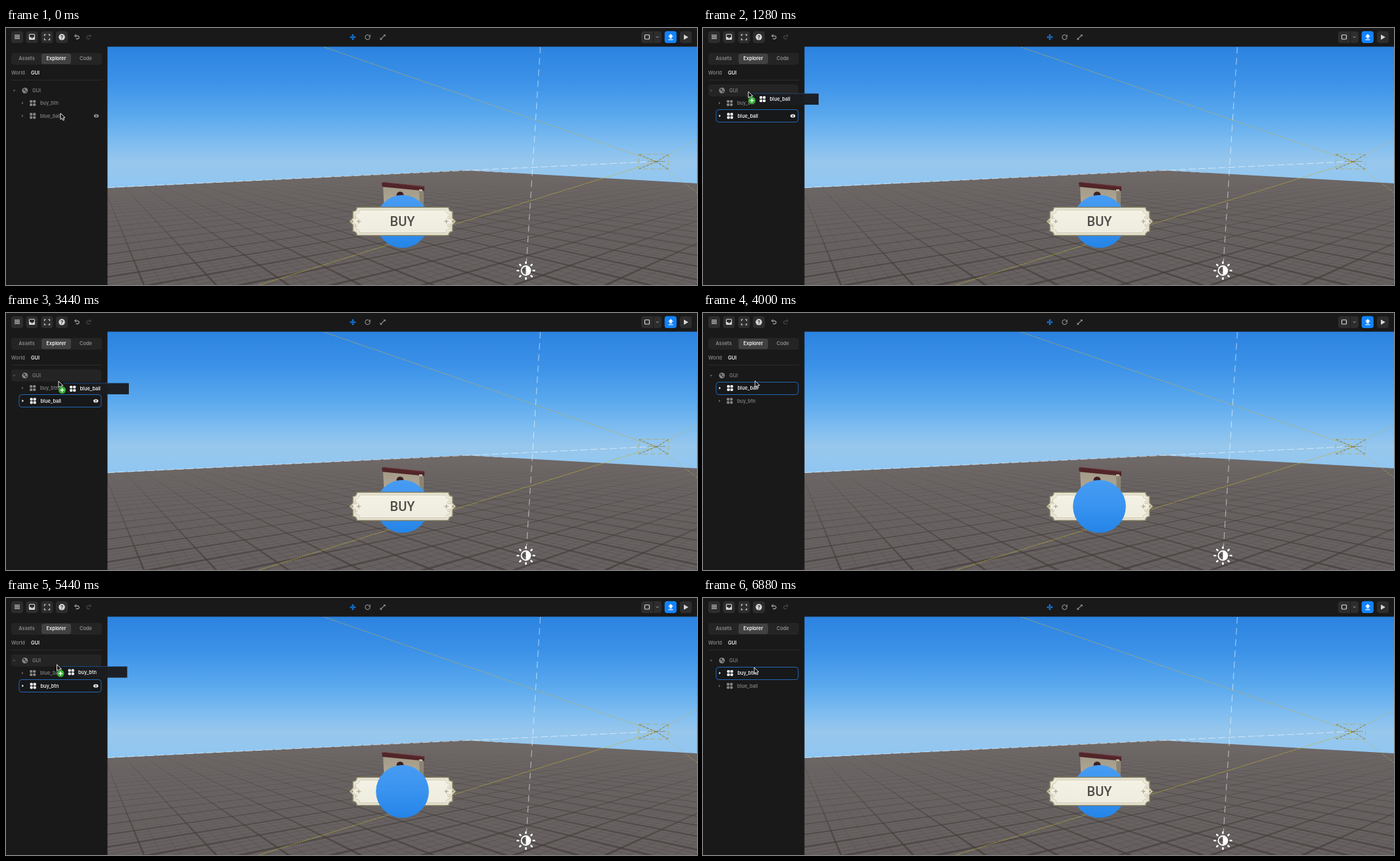
Write an HTML page with a canvas that moves like this. It is 1052 by 392 pixels and loops after 6.96 s.

```html
<!DOCTYPE html>
<html lang="en">
<head>
<meta charset="utf-8">
<title>Scene editor</title>
<style>
html, body { margin: 0; width: 100%; height: 100%; overflow: hidden; background: #191919; }
canvas { display: block; width: 1052px; height: 392px; }
</style>
</head>
<body>
<canvas id="stage" width="1052" height="392"></canvas>
<script>
const W = 1052, H = 392, LOOP = 6960, STEP = 80;
const view = document.getElementById('stage').getContext('2d');
let g = view;

function poly(points, fill, stroke, width = 1, close = true) {
  g.beginPath();
  points.forEach(([x, y], i) => i ? g.lineTo(x, y) : g.moveTo(x, y));
  if (close) g.closePath();
  if (fill) { g.fillStyle = fill; g.fill(); }
  if (stroke) { g.strokeStyle = stroke; g.lineWidth = width; g.stroke(); }
}
function line(x1, y1, x2, y2, color, width = 1, dash = []) {
  g.setLineDash(dash);
  poly([[x1, y1], [x2, y2]], null, color, width, false);
  g.setLineDash([]);
}
function box(x, y, w, h, r, fill, stroke, width = 1) {
  g.beginPath();
  g.roundRect(x, y, w, h, r);
  if (fill) { g.fillStyle = fill; g.fill(); }
  if (stroke) { g.strokeStyle = stroke; g.lineWidth = width; g.stroke(); }
}
function disc(x, y, r, fill) {
  g.beginPath();
  g.arc(x, y, r, 0, 7);
  g.fillStyle = fill;
  g.fill();
}
function arc(x, y, r, from, to, color, width) {
  g.beginPath();
  g.arc(x, y, r, from, to);
  g.strokeStyle = color;
  g.lineWidth = width;
  g.stroke();
}
function text(s, x, y, color, weight = 500, size = 7.4, align = 'left') {
  g.font = `${weight} ${size}px Inter, sans-serif`;
  g.textAlign = align;
  g.textBaseline = 'alphabetic';
  g.fillStyle = color;
  g.fillText(s, x, y + size * 0.36);
}
function fade(y1, y2, ...stops) {
  const f = g.createLinearGradient(0, y1, 0, y2);
  stops.forEach(([p, c]) => f.addColorStop(p, c));
  return f;
}
function spokes(x, y, r, color, width, count, inner = 0) {
  for (let i = 0; i < count; i++) {
    const a = i * 2 * Math.PI / count, c = Math.cos(a), s = Math.sin(a);
    line(x + c * inner, y + s * inner, x + c * r, y + s * r, color, width);
  }
}

// Lines through one vanishing point, evenly spaced along the bottom edge.
function gridLines(vx, vy, start, gap, count) {
  for (let i = 0; i < count * 4; i++) {
    const bold = i % 4 === 0;
    const x = start + i * gap / 4;
    const shade = bold
      ? fade(215, H, [0, 'rgba(72,64,63,.05)'], [0.3, 'rgba(72,64,63,.35)'], [1, 'rgba(68,61,60,.75)'])
      : fade(215, H, [0, 'rgba(80,72,71,.02)'], [0.3, 'rgba(80,72,71,.13)'], [1, 'rgba(78,70,69,.38)']);
    const near = bold ? 2.6 : 1, base = 0.4;
    const at = y => vx + (x - vx) * (y - vy) / (H - vy);
    const w = y => (base + near * (y - 215) / (H - 215)) / 2;
    const slope = Math.min(6, Math.hypot(1, (x - vx) / (H - vy)));
    poly([[at(215) - w(215) * slope, 215], [at(215) + w(215) * slope, 215],
      [x + w(H) * slope, H], [x - w(H) * slope, H]], shade);
  }
}

function drawWorld() {
  g.fillStyle = fade(28, 240, [0, '#2c83e0'], [0.25, '#3c92e8'], [0.5, '#5aa9ee'],
    [0.72, '#83bff0'], [0.83, '#98c7ec'], [0.92, '#94c7ef'], [1, '#8fc6f1']);
  g.fillRect(154, 28, 898, 221);

  g.save();
  const ground = [[154, 244], [700, 217], [W, 237], [W, H], [154, H]];
  poly(ground, fade(217, H, [0, '#706a69'], [0.35, '#6a6564'], [1, '#666160']));
  g.clip();
  gridLines(125, 184, 210, 110, 33);
  gridLines(1367, 184, -2840, 139, 32);
  g.restore();

  line(155, 243.5, 990, 203.5, 'rgba(255,255,255,.7)', 0.8, [11, 4]);
  line(700, 217, 770, 221, 'rgba(255,255,255,.4)', 0.7, [8, 6]);
  line(813.5, 29, 792.5, 356, 'rgba(255,255,255,.75)', 0.8, [10, 7]);

  // Camera frustum
  const gold = '#c0ae56';
  line(484, 29, 990, 204, gold, 0.75, [3, 1]);
  line(385, 392, 990, 204, '#c2b035', 0.75, [3, 1]);
  line(990, 204, W, 170, gold, 0.7, [3, 2]);
  line(990, 204, W, 251, gold, 0.7, [3, 2]);
  g.setLineDash([7, 4]);
  box(963.5, 192.5, 45, 22.5, 0, null, '#b5a552', 0.7);
  g.setLineDash([]);
  for (const [x, y] of [[964, 193], [1008, 193], [964, 215], [1008, 215]])
    line(x, y, 990, 204, '#6f693f', 0.8, [4, 2]);
  line(977, 203.5, 1004, 203.5, '#8a814c', 0.7);
  line(986, 198, 985, 211, '#d9c24a', 0.7, [3, 2]);

  // Sun gizmo
  const sx = 791.5, sy = 370;
  arc(sx, sy, 7, 0, 7, '#fff', 1.8);
  g.beginPath();
  g.arc(sx, sy, 6.5, -Math.PI / 2, Math.PI / 2);
  g.fillStyle = '#fff';
  g.fill();
  g.lineCap = 'round';
  spokes(sx, sy, 13, '#fff', 2.6, 8, 11.3);
  g.lineCap = 'butt';

  // Shop
  poly([[574, 241], [636, 247], [635, 280], [576, 280]], fade(242, 280, [0, '#a39b88'], [1, '#b5ad98']));
  poly([[629, 247], [636, 248], [635, 280], [630, 280]], '#8b8473');
  disc(600, 255, 5.5, '#3b2021');
  poly([[572, 236], [575, 235.5], [637, 241.5], [637, 248.5], [573, 242.3]], '#512529');
  poly([[573, 235.5], [576, 235.2], [637, 241.3], [636, 243]], '#6c3437');
  poly([[629, 246], [634, 246.5], [634, 249], [629, 248.5]], '#c9c1ae');
}

function drawBall() {
  disc(603.5, 295, 40.3, fade(255, 335, [0, '#479cf3'], [0.45, '#3a94f0'], [1, '#2485e8']));
}

function plate(inset) {
  const cx = 604, cy = 295, w = 76 - inset, h = 21.5 - inset, n = 6, tip = 81 - inset;
  g.beginPath();
  g.moveTo(cx - w + n, cy - h);
  g.lineTo(cx + w - n, cy - h);
  g.quadraticCurveTo(cx + w - n, cy - h + n, cx + w, cy - h + n);
  g.lineTo(cx + w, cy - 5);
  g.quadraticCurveTo(cx + w + 2, cy - 3, cx + tip, cy);
  g.quadraticCurveTo(cx + w + 2, cy + 3, cx + w, cy + 5);
  g.lineTo(cx + w, cy + h - n);
  g.quadraticCurveTo(cx + w - n, cy + h - n, cx + w - n, cy + h);
  g.lineTo(cx - w + n, cy + h);
  g.quadraticCurveTo(cx - w + n, cy + h - n, cx - w, cy + h - n);
  g.lineTo(cx - w, cy + 5);
  g.quadraticCurveTo(cx - w - 2, cy + 3, cx - tip, cy);
  g.quadraticCurveTo(cx - w - 2, cy - 3, cx - w, cy - 5);
  g.lineTo(cx - w, cy - h + n);
  g.quadraticCurveTo(cx - w + n, cy - h + n, cx - w + n, cy - h);
  g.closePath();
}
function drawPlate() {
  plate(0);
  g.fillStyle = fade(273, 317, [0, '#f4f2e5'], [1, '#eeecde']);
  g.fill();
  g.strokeStyle = '#827c61';
  g.lineWidth = 1.5;
  g.stroke();
  plate(1.6);
  g.strokeStyle = '#d8d4bc';
  g.lineWidth = 1.2;
  g.stroke();
  plate(4);
  g.strokeStyle = '#bfbaa0';
  g.lineWidth = 0.8;
  g.stroke();
  for (const x of [537, 670.5]) {
    const star = [];
    for (let i = 0; i < 8; i++) {
      const r = i % 2 ? 1.3 : 4.5, a = i * Math.PI / 4;
      star.push([x + r * Math.cos(a), 295 + r * Math.sin(a)]);
    }
    poly(star, '#b7b29c');
    const out = x < 600 ? -1 : 1;
    for (const s of [-1, 1]) arc(x + out * 4, 295 + s * 6, 2, 0, 5, '#c2bda5', 0.9);
    disc(x + out * 10, 295, 1.8, '#a8a27f');
  }
  g.font = '500 20px Roboto, sans-serif';
  g.textAlign = 'center';
  g.textBaseline = 'alphabetic';
  g.fillStyle = '#524d4b';
  g.fillText('BUY', 603.5, 302);
}

function arrows4(x, y, r, color, width, out) {
  spokes(x, y, r, color, width, 4);
  for (let i = 0; i < 4; i++) {
    g.save();
    g.translate(x, y);
    g.rotate(i * Math.PI / 2);
    poly([[r + out, 0], [r - 1, -2], [r - 1, 2]], color);
    g.restore();
  }
}
function bend(x, y, dir, color) {
  g.save();
  g.translate(x, y);
  g.scale(dir, 1);
  line(-2.5, -1.5, 1, -1.5, color);
  arc(1, 0.8, 2.3, -Math.PI / 2, Math.PI / 2, color, 1);
  line(1, 3.1, -1.5, 3.1, color);
  poly([[-1.2, -3.8], [-3.5, -1.5], [-1.2, 0.8]], null, color, 1, false);
  g.restore();
}

function drawChrome() {
  g.fillStyle = '#191919';
  g.fillRect(0, 0, W, 28.5);
  g.fillRect(0, 0, 154.5, H);
  const lite = '#d6d6d6', dim = '#8b8b8b', key = '#2d2d2d';
  for (const x of [8, 30.5, 53.5, 76, 1026]) box(x, 5, 18, 18, 4, key);
  for (const y of [11, 13.5, 16]) line(13, y, 21, y, lite, 1.2);
  box(35.5, 9.5, 8, 8, 1.2, null, lite, 1.2);
  poly([[35.5, 14], [38, 14], [39, 15.5], [40.5, 15.5], [41.5, 14], [43.5, 14], [43.5, 18], [35.5, 18]], lite);
  for (const a of [-1, 1]) for (const b of [-1, 1])
    poly([[62.5 + a * 1.7, 14 + b * 4], [62.5 + a * 4, 14 + b * 4], [62.5 + a * 4, 14 + b * 1.7]], null, lite, 1.2, false);
  disc(85, 13.8, 4.8, lite);
  text('?', 85, 13.8, key, 700, 7.5, 'center');
  bend(108, 13.5, 1, lite);
  bend(126, 13.5, -1, '#555');

  arrows4(528, 14, 3.5, '#1683f5', 1.2, 1.2);
  arc(550.5, 14, 3.6, -0.2, 5.2, dim, 1.2);
  poly([[554.8, 9.6], [554.8, 13.2], [551.3, 13.2]], dim);
  line(570.5, 17, 576.5, 11, dim, 1.1);
  poly([[574.3, 10], [577.8, 10], [577.8, 13.5]], dim);
  poly([[569.5, 14.5], [569.5, 18], [573, 18]], dim);

  box(967, 5, 18, 18, [4, 0, 0, 4], key);
  box(986, 5, 12, 18, [0, 4, 4, 0], key);
  box(972.5, 10.5, 7, 6.5, 1, null, lite, 1.2);
  poly([[989.8, 12.8], [991.8, 14.8], [993.8, 12.8]], null, '#aaa', 1, false);
  box(1002.7, 4.7, 18.2, 18.2, 4, '#1283fb');
  poly([[1012, 9], [1016, 13.3], [1013.6, 13.3], [1013.6, 16], [1010.4, 16], [1010.4, 13.3], [1008, 13.3]], '#fff');
  line(1008.5, 17.8, 1015.5, 17.8, '#fff', 1.2);
  poly([[1032, 10], [1038.8, 14], [1032, 18]], lite);

  box(8, 38, 138, 18, 4, '#242424');
  box(54, 39, 45, 16, 3.5, '#414141');
  text('Assets', 31.5, 46.8, dim, 600, 7.4, 'center');
  text('Explorer', 76.5, 46.8, '#f2f2f2', 600, 7.4, 'center');
  text('Code', 121.5, 46.8, dim, 600, 7.4, 'center');
  text('World', 8, 68.2, dim, 500);
  text('GUI', 38, 68.2, '#f2f2f2', 600);
  line(8, 79.5, 146, 79.5, '#2b2b2b');
}

const back = document.createElement('canvas');
back.width = W;
back.height = H;
g = back.getContext('2d');
drawWorld();
drawChrome();
g = view;

// time, x, y of the pointer tip
const path = [[0, 83, 130], [560, 83, 130], [800, 82, 128], [1280, 69, 97], [1600, 71, 100],
  [2000, 74, 101], [2500, 75, 101], [2560, 76, 124.1], [2800, 82, 131], [3040, 83, 130],
  [3440, 80, 104], [3900, 79, 103], [4300, 80, 106], [4640, 87, 130], [4880, 87, 132],
  [5080, 86, 130], [5440, 77.5, 101.5], [5920, 78, 102], [6300, 79, 96], [6560, 79, 86],
  [6760, 79, 97], [6880, 78, 106], [LOOP, 79, 111]];
const drags = [[960, 1840], [3120, 3920], [5120, 5920]];
const PICK = 480, FRONT = 3920, PICK_BTN = 5040, RESET = 5920;

function pointer(t) {
  const i = Math.max(1, path.findIndex(p => p[0] >= t));
  const [t0, x0, y0] = path[i - 1], [t1, x1, y1] = path[i];
  const k = (t - t0) / (t1 - t0), e = k * k * (3 - 2 * k);
  return [x0 + (x1 - x0) * e, y0 + (y1 - y0) * e];
}
// Grows from 0 to 1 as the pointer stays over a row.
function hover(t, y) {
  let n = 0;
  for (let i = 0; i < 5; i++) {
    const py = pointer(Math.max(0, t - i * 30))[1];
    if (Math.abs(py - y) < 9.75) n++;
  }
  return (n - 1) / 4;
}

function nodeIcon(x, y, color) {
  for (const a of [-2.5, 2.5]) for (const b of [-2.5, 2.5])
    box(x + a - 2, y + b - 2, 4, 4, 1.3, color);
}
function eye(x, y, s, color) {
  if (s <= 0) return;
  g.save();
  g.translate(x, y);
  g.scale(s, s);
  g.beginPath();
  g.ellipse(0, 0, 3.7, 2.6, 0, 0, 7);
  g.fillStyle = color;
  g.fill();
  disc(0, 0, 1.5, '#191919');
  disc(0, 0, 0.8, color);
  g.restore();
}
function row(name, y, selected, seen) {
  const color = selected ? '#fff' : '#858585', x = selected ? 0.5 : 0;
  if (selected) box(20, Math.floor(y - 9.5) + 0.5, 125, 19, 4, '#17181a', '#2268b4', 1);
  poly([[24 + x, y - 2], [26.5 + x, y], [24 + x, y + 2]], selected ? '#fff' : '#666');
  nodeIcon(40.7 + x, y, color);
  text(name, 52 + x, y, color, 500);
  eye(selected ? 136.8 : 137.5, y, seen, selected ? '#fff' : '#9a9a9a');
}
function rootRow(over) {
  if (over) box(8, 86, 137, 18.5, 4, '#242424');
  poly([[10.5, 94.5], [14.5, 94.5], [12.5, 97]], over ? '#555' : '#666');
  disc(28.8, 95.3, 4.4, '#858585');
  poly([[26, 93], [28.5, 92.5], [29.5, 95], [27.5, 96]], '#2a2a2a');
  poly([[29.5, 96], [31.8, 95.5], [31, 98], [29.5, 98.2]], '#2a2a2a');
  text('GUI', 40, 95.5, '#858585', 500);
}
function ghost(name, x, y) {
  const f = g.createLinearGradient(x + 2, 0, x + 40, 0);
  f.addColorStop(0, 'rgba(24,25,28,.2)');
  f.addColorStop(0.3, 'rgba(24,25,28,.9)');
  f.addColorStop(1, 'rgba(27,28,32,.97)');
  g.fillStyle = f;
  g.fillRect(x + 2, y + 3, 105, 17);
  line(x + 8, y + 3, x + 107, y + 3, '#1f5b9f', 1, [2, 1]);
  nodeIcon(x + 21.7, y + 11.5, '#fff');
  text(name, x + 32.5, y + 11.5, '#fff', 500);
}
function badge(x, y) {
  disc(x, y, 5.5, '#35b134');
  line(x - 3, y, x + 3, y, '#fff', 1.4);
  line(x, y - 3, x, y + 3, '#fff', 1.4);
}
function arrow(x, y) {
  g.lineJoin = 'round';
  poly([[x, y], [x, y + 9.5], [x + 2.3, y + 7.5], [x + 4, y + 11], [x + 5.6, y + 10.2],
    [x + 4, y + 6.9], [x + 7, y + 6.8]], '#0a0a0a', '#fff', 0.9);
  g.lineJoin = 'miter';
}

function draw(t) {
  g.drawImage(back, 0, 0);
  const ballFront = t >= FRONT && t < RESET;
  if (ballFront) { drawPlate(); drawBall(); } else { drawBall(); drawPlate(); }

  const picked = t < PICK ? '' : t < PICK_BTN ? 'blue_ball' : 'buy_btn';
  const dragging = drags.some(([a, b]) => t >= a && t < b);
  const names = ballFront ? ['blue_ball', 'buy_btn'] : ['buy_btn', 'blue_ball'];
  const [x, y] = pointer(t);
  rootRow(dragging);
  names.forEach((name, i) => {
    const ry = 114.5 + i * 19.5, on = name === picked;
    row(name, ry, on, dragging ? +on : hover(t, ry));
  });
  if (dragging) ghost(picked, x, y);
  if (t >= 4640 && t < 5120) {
    arrows4(x + 0.8, y + 0.5, 3.4, '#fff', 2.6, 2);
    arrows4(x + 0.8, y + 0.5, 3, '#111', 1, 1);
  } else arrow(x, y);
  if (dragging) badge(x + 5.5, y + 13.5);
}

const begin = performance.now();
function tick() {
  const t = (performance.now() - begin) % LOOP;
  draw(Math.floor(t / STEP) * STEP);
  requestAnimationFrame(tick);
}
tick();
</script>
</body>
</html>
```
